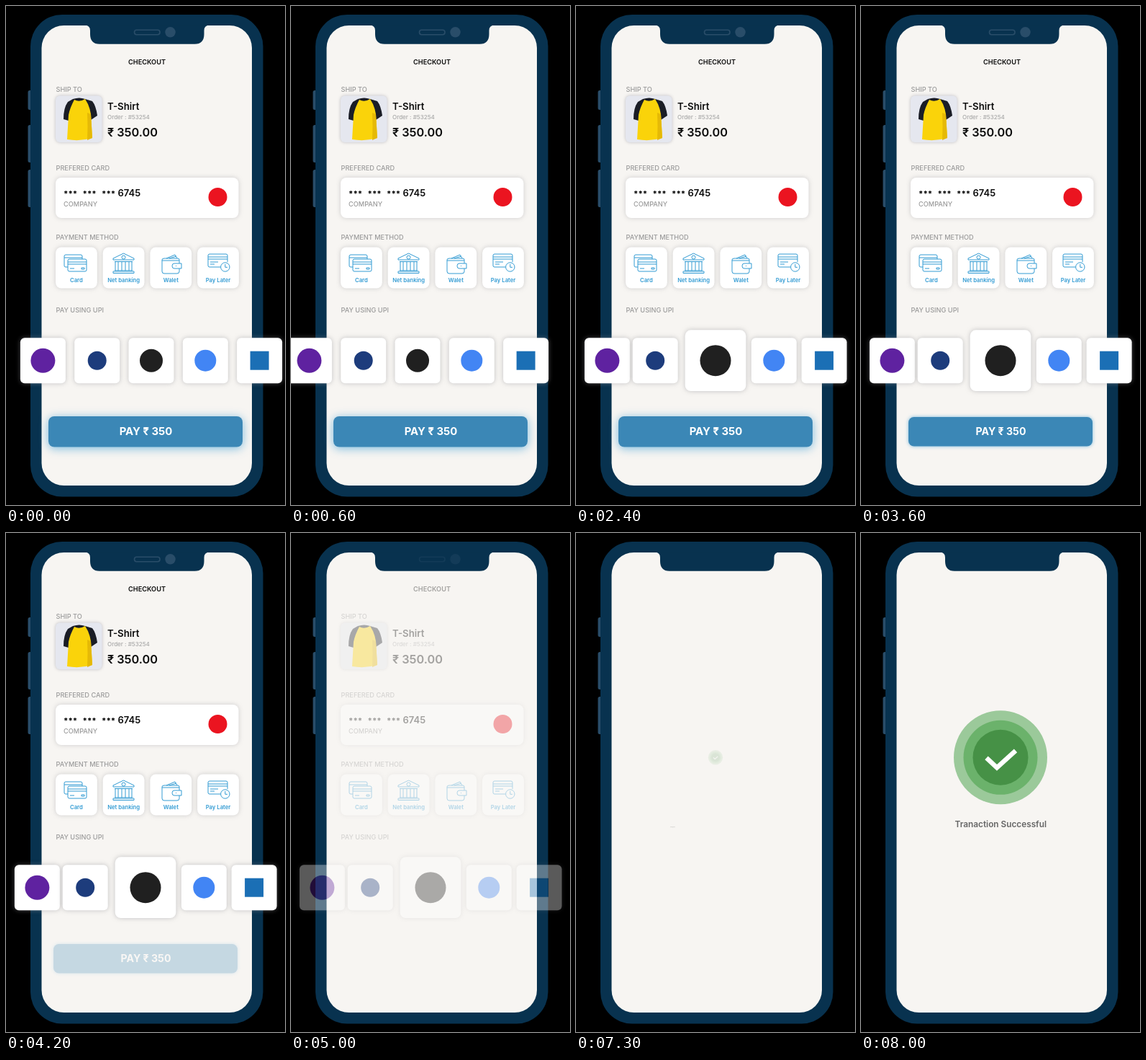
An HTML page with a canvas that plays this animation: 388x692 px, repeating every 8200 ms.

```html
<!DOCTYPE html>
<html lang="en">
<head>
<meta charset="utf-8">
<title>Checkout</title>
<style>
  html, body { margin: 0; width: 100%; height: 100%; overflow: hidden; background: #000; }
  canvas { display: block; width: 388px; height: 692px; }
</style>
</head>
<body>
<canvas id="stage"></canvas>
<script>
const W = 388, H = 692, LOOP = 8200, STEP = 100;
const BG = '#f7f5f2', NAVY = '#08324f', NAVY_LIGHT = '#294d69', BLUE = '#3b87b6', ICON = '#329bd3';
const GREY = '#9b9b9b', INK = '#0c0c0c';

const dpr = window.devicePixelRatio || 1;

function context(canvas) {
  canvas.width = W * dpr;
  canvas.height = H * dpr;
  return canvas.getContext('2d');
}

const buffer = context(document.createElement('canvas'));
let ctx = context(document.getElementById('stage'));

const progress = (t, a, b) => Math.min(1, Math.max(0, (t - a) / (b - a)));
const smooth = p => p * p * (3 - 2 * p);
const ease = (t, a, b) => smooth(progress(t, a, b));
const mix = (a, b, p) => a + (b - a) * p;

// Eased value through [time, value] pairs
function follow(t, keys) {
  for (let i = 1; i < keys.length; i++) {
    const [t0, v0] = keys[i - 1], [t1, v1] = keys[i];
    if (t < t1) return mix(v0, v1, ease(t, t0, t1));
  }
  return keys[keys.length - 1][1];
}

// Fades a drawing as one flat group
function layer(alpha, draw) {
  if (alpha <= 0) return;
  const page = ctx;
  if (alpha < 1) {
    ctx = buffer;
    ctx.setTransform(dpr, 0, 0, dpr, 0, 0);
    ctx.clearRect(0, 0, W, H);
  }
  ctx.save();
  draw();
  ctx.restore();
  ctx = page;
  if (alpha < 1) {
    ctx.save();
    ctx.globalAlpha = alpha;
    ctx.drawImage(buffer.canvas, 0, 0, W, H);
    ctx.restore();
  }
}

function box(x, y, w, h, r, fill, shadow, blur = 0, drop = 0) {
  ctx.save();
  if (shadow) {
    ctx.shadowColor = shadow;
    ctx.shadowBlur = blur * dpr;
    ctx.shadowOffsetY = drop * dpr;
  }
  ctx.fillStyle = fill;
  ctx.beginPath();
  ctx.roundRect(x, y, w, h, r);
  ctx.fill();
  ctx.restore();
}

function disc(x, y, r, fill) {
  ctx.fillStyle = fill;
  ctx.beginPath();
  ctx.arc(x, y, r, 0, Math.PI * 2);
  ctx.fill();
}

function label(str, x, y, size, weight, fill, align = 'left') {
  ctx.font = `${weight} ${size}px Inter, "Open Sans", sans-serif`;
  ctx.textAlign = align;
  ctx.fillStyle = fill;
  ctx.fillText(str, x, y);
}

function shape(path, fill) {
  ctx.fillStyle = fill;
  ctx.fill(new Path2D(path));
}

const panel = (x, y, w, h) => box(x, y, w, h, 8, '#fff', 'rgba(130,130,135,.36)', 6);
const heading = (str, y) => label(str, 69.5, y, 9.2, 500, GREY);

function drawPhone() {
  for (const [y, h] of [[117, 27], [165, 52], [227, 52]]) box(30.5, y, 8, h, 2.5, NAVY_LIGHT);
  box(34, 12, 323.5, 668.5, 44, NAVY);
  box(49.5, 27, 292.5, 638, 31, BG);
  shape('M110 26.5Q117 27 117 34V39Q117 52.8 130 52.8H262.5Q275.5 52.8 275.5 39V34Q275.5 27 282.5 26.5Z', NAVY);
}

function drawSensors() {
  ctx.strokeStyle = NAVY_LIGHT;
  ctx.lineWidth = 1.6;
  ctx.beginPath();
  ctx.roundRect(178.5, 33.3, 35.5, 6.4, 3.2);
  ctx.stroke();
  disc(228.5, 36.3, 7.2, NAVY_LIGHT);
}

function drawShirt() {
  box(69, 124.5, 64.5, 64.5, 6, '#e5e7ef', 'rgba(120,120,135,.45)', 4);
  shape('M93 129Q102 126 110 129L120 132Q125 138 127 152L118 158L87 159L80 157Q80 141 86 133Z', '#1a1d26');
  shape('M95 130Q102 134 110 129L114 136Q117 143 118 150L120 183Q103 188 85 185L87 151Q89 141 95 130Z', '#fad30a');
  shape('M113 148Q114 167 113 186L120 183L118 150Z', '#e5b906');
}

const ICONS = {
  card: 'M86 362H83Q81 362 81 360V347Q81 345 83 345H104Q106 345 106 347V351M81 349H106' +
    'M88 351H110Q112 351 112 353V366Q112 368 110 368H88Q86 368 86 366V353Q86 351 88 351Z' +
    'M86 355H112M86 358H112M89 364H95M105 363H109V365H105Z',
  bank: 'M149 352V350L163.5 343L178 350V352ZM151 354.5H176M149 370.5H178V368H149Z' +
    'M152 355V367M156 355V367M161 355V367M166 355V367M171 355V367M175 355V367M151 367H176' +
    'M166 348.5A2.5 2.5 0 1 1 161 348.5A2.5 2.5 0 1 1 166 348.5',
  wallet: 'M220 350H239Q241 350 241 352V357M241 364V368Q241 371 238 371H220Q217 371 217 368V352Q217 350 220 350' +
    'M223 350L235 345L238 350M227 350L237 347M234 357H244V364H234Q231 364 231 360.5Q231 357 234 357Z' +
    'M236 360.5H237M217 353H241',
  later: 'M298 362H283Q281 362 281 360V346Q281 344 283 344H306Q308 344 308 346V355M281 348H308M281 351H308' +
    'M284 358H290M284 355H295M311 362A6.2 6.2 0 1 1 298.6 362A6.2 6.2 0 1 1 311 362M304.8 358V362.3H308'
};
const METHODS = [['Card', 'card'], ['Net banking', 'bank'], ['Walet', 'wallet'], ['Pay Later', 'later']];

function drawMethods() {
  METHODS.forEach(([name, icon], i) => {
    const x = 69 + i * 65.7;
    panel(x, 334.5, 57.8, 57);
    ctx.strokeStyle = ICON;
    ctx.lineWidth = 1;
    ctx.lineJoin = 'round';
    ctx.stroke(new Path2D(ICONS[icon]));
    label(name, x + 28.9, 382.5, 7.7, 600, ICON, 'center');
  });
}

function drawCheckout() {
  label('CHECKOUT', 196, 81, 9.2, 600, INK, 'center');
  heading('SHIP TO', 119.3);
  drawShirt();
  label('T-Shirt', 141, 143.5, 13.2, 600, INK);
  label('Order : #53254', 141, 157, 8.05, 500, '#a9a9a9');
  label('₹ 350.00', 141, 181, 16.3, 600, INK);

  heading('PREFERED CARD', 227.5);
  panel(69, 238, 254.5, 56);
  for (const x of [80, 106.5, 133]) label('***', x, 264, 11, 800, INK);
  label('6745', 155.5, 264, 13, 600, INK);
  label('COMPANY', 80, 277.5, 9.2, 500, GREY);
  disc(294.5, 265, 13, '#eb1420');

  heading('PAYMENT METHOD', 324.2);
  drawMethods();
  heading('PAY USING UPI', 425.2);
}

const OPTIONS = [
  () => disc(0, 0, 17, '#5f22a0'),
  () => disc(0, 0, 13, '#1d3c7c'),
  () => disc(0, 0, 16, '#202020'),
  () => disc(0, 0, 15, '#4285f4'),
  () => box(-13, -13, 26, 26, 0, '#1b6fb5')
];
const ROW_KEYS = [[0, 202], [450, 168], [1000, 212], [1900, 194]];
const PUSH = [0, -8.5, 0, 6, 0.5];

function drawRow(t) {
  const mid = follow(t, ROW_KEYS);
  const grow = ease(t, 1850, 2400);
  OPTIONS.forEach((mark, i) => {
    const k = i === 2 ? 1 + 0.345 * grow : 1;
    ctx.save();
    ctx.translate(mid + (i - 2) * 75.3 + PUSH[i] * grow, 491.7);
    ctx.scale(k, k);
    box(-31.5, -31.5, 63, 63, 6, '#fff', 'rgba(140,140,145,.5)', 6);
    mark();
    ctx.restore();
  });
}

function drawButton(t) {
  const press = ease(t, 3300, 3600);
  const k = mix(1, 0.948, press);
  layer(1 - ease(t, 3800, 4400), () => {
    ctx.translate(194, 590.3);
    ctx.scale(k, k);
    box(-135, -21.3, 270, 42.6, 8, BLUE, 'rgba(80,165,215,.75)', mix(13, 5, press), mix(2, 0, press));
    label('PAY ₹ 350', 0.5, 5, 14.9, 700, '#fff', 'center');
  });
}

function drawSecure() {
  const fill = ctx.createLinearGradient(85, 0, 307, 0);
  fill.addColorStop(0, '#0c35ff');
  fill.addColorStop(0.55, '#5420f4');
  fill.addColorStop(1, '#a00cec');
  label('FernoTray', 196, 340, 45, 800, fill, 'center');
  label('Payment Encrypted !', 194, 374.7, 12.35, 500, '#5c5c5c', 'center');
}

function drawSuccess(p) {
  layer(p, () => {
    ctx.save();
    ctx.translate(194, 311.3);
    ctx.scale(p, p);
    disc(0, 0, 65, '#9bc99a');
    disc(0, 0, 51.5, '#6bb26b');
    disc(0, 0, 38.5, '#469146');
    ctx.strokeStyle = '#fff';
    ctx.lineWidth = 6.5;
    ctx.lineJoin = 'miter';
    ctx.lineCap = 'butt';
    ctx.stroke(new Path2D('M-19.5 0.5L-5 14L21 -9.5'));
    ctx.restore();

    // The caption rises out of its baseline while it is wiped in
    ctx.beginPath();
    ctx.rect(129, 390, 131 * p, 18.5);
    ctx.clip();
    label('Tranaction Successful', 194.3, 408 + 9 * (1 - p), 11.8, 600, '#666', 'center');
  });
}

function render(now) {
  const t = Math.floor((now % LOOP) / STEP) * STEP;
  ctx.setTransform(dpr, 0, 0, dpr, 0, 0);
  ctx.fillStyle = '#000';
  ctx.fillRect(0, 0, W, H);
  drawPhone();
  layer(1 - ease(t, 4700, 5200), () => {
    drawSensors();
    drawCheckout();
    drawRow(t);
    drawButton(t);
  });
  layer(ease(t, 5100, 5600) * (1 - ease(t, 6500, 6900)), drawSecure);
  drawSuccess(progress(t, 7170, 8000));
}

function tick() {
  render(performance.now());
  requestAnimationFrame(tick);
}
tick();
</script>
</body>
</html>
```
